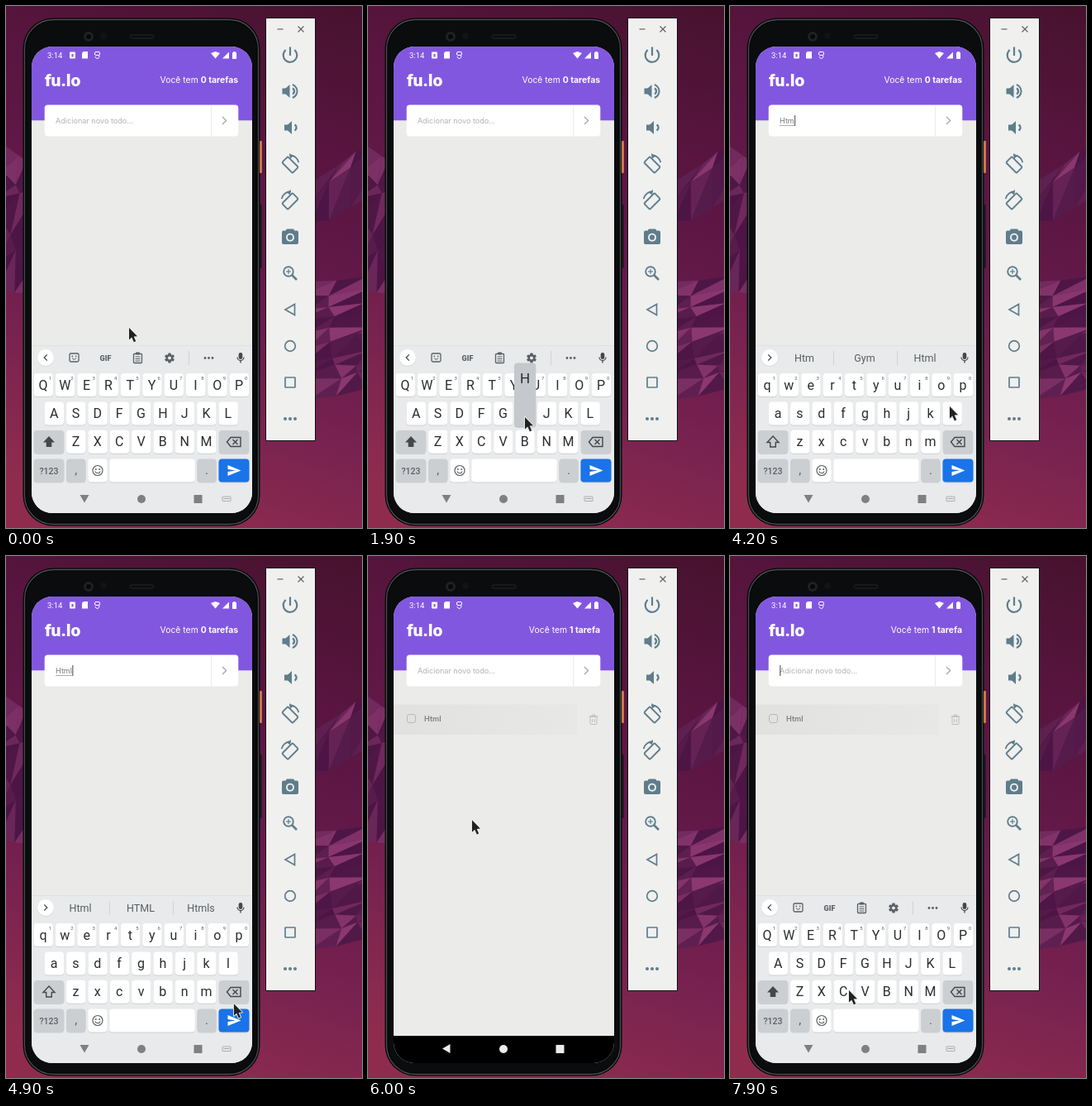
An HTML page with a canvas that plays this animation: 431x631 px, repeating every 8000 ms.

```html
<!DOCTYPE html>
<html lang="pt">
<head>
<meta charset="utf-8">
<style>
html, body { margin: 0; width: 100%; height: 100%; overflow: hidden; background: #64184a; }
canvas { display: block; width: 431px; height: 631px; }
</style>
</head>
<body>
<canvas id="stage"></canvas>
<script>
const W = 431, H = 631, LOOP = 8000, STEP = 100;
const canvas = document.getElementById('stage');
const c = canvas.getContext('2d');
const dpr = window.devicePixelRatio || 1;
canvas.width = W * dpr;
canvas.height = H * dpr;

const UI = 'Inter, sans-serif', KEY = 'Roboto, sans-serif';
const SLATE = '#5f7d8b', INK = '#2b2d2f', GRAY = '#5c6064', DARK = '#45484b', SPECIAL = '#cbcfd2';
const ROWS = ['qwertyuiop', 'asdfghjkl', 'zxcvbnm'], PITCH = 26.35, MID = 163.8;
const SEND = 5300, ADDED = 5600, FOCUS = 6800, BLINK = 500, PANEL = 202;

const PRESSES = [
  { down: 1800, up: 2000, ch: 'H', hints: ['H', 'Hoje', 'Há'] },
  { down: 2500, up: 2700, ch: 't', hints: ['Ht', 'HT', 'Https'] },
  { down: 3700, up: 3900, ch: 'm', hints: ['Htm', 'Gym', 'Html'] },
  { down: 4600, up: 4800, ch: 'l', hints: ['Html', 'HTML', 'Htmls'] }
];
// start, end and goal of each pointer move
const HOME = [149, 389];
const MOVES = [
  [300, 1300, 190, 497], [2000, 2300, 161, 462], [2600, 3500, 249, 523], [3900, 4200, 266, 484],
  [4700, 5100, 280, 565], [5400, 6100, 122, 313], [6100, 6500, 109, 141],
  [6800, 7000, 95, 210], [7000, 7700, 144, 525]
];

const ramp = (t, a, b) => Math.min(1, Math.max(0, (t - a) / (b - a)));
const easeOut = u => Math.sin(u * Math.PI / 2);

function pointerAt(t) {
  let [x, y] = HOME;
  for (const [a, b, gx, gy] of MOVES) {
    const k = easeOut(ramp(t, a, b));
    x += (gx - x) * k;
    y += (gy - y) * k;
  }
  return [x, y];
}

// shut runs 0 to 1 as the keyboard closes
function panelAt(t) {
  const opening = t >= FOCUS;
  const shut = opening ? 1 - ramp(t, FOCUS, FOCUS + 600) : ramp(t, SEND, SEND + 300);
  return { shut, slide: PANEL * shut ** (opening ? 2.1 : 2.7) };
}

function fieldAt(t) {
  if (t >= ADDED) return { word: '', hints: null, since: FOCUS + 100 };
  const done = PRESSES.filter(p => t >= p.up), last = done[done.length - 1];
  if (!last) return { word: '', hints: null, since: 100 };
  return { word: done.map(p => p.ch).join(''), hints: t < SEND ? last.hints : [], since: last.up };
}

function box(x, y, w, h, r, fill) {
  c.beginPath();
  c.roundRect(x, y, w, h, r);
  c.fillStyle = fill;
  c.fill();
}
function frame(x, y, w, h, r, color, lw = 1) {
  c.beginPath();
  c.roundRect(x, y, w, h, r);
  c.strokeStyle = color;
  c.lineWidth = lw;
  c.stroke();
}
function trace(p, close) {
  c.beginPath();
  for (let i = 0; i < p.length; i += 2) c.lineTo(p[i], p[i + 1]);
  if (close) c.closePath();
}
function poly(p, fill) {
  trace(p, true);
  c.fillStyle = fill;
  c.fill();
}
function line(p, color, lw = 1, close = false) {
  trace(p, close);
  c.strokeStyle = color;
  c.lineWidth = lw;
  c.stroke();
}
function arc(x, y, r, color, lw, a = 0, b = 360) {
  c.beginPath();
  c.arc(x, y, r, a * Math.PI / 180, b * Math.PI / 180);
  c.strokeStyle = color;
  c.lineWidth = lw;
  c.stroke();
}
function dot(x, y, r, fill) {
  c.beginPath();
  c.arc(x, y, r, 0, Math.PI * 2);
  c.fillStyle = fill;
  c.fill();
}
function dots(x, y, gap, r, fill) {
  for (let i = -1; i <= 1; i++) dot(x + i * gap, y, r, fill);
}
function cross(x, y, r, color, lw) {
  line([x - r, y - r, x + r, y + r], color, lw);
  line([x + r, y - r, x - r, y + r], color, lw);
}
function chevron(x, y, dx, dy, color) {
  line([x - dx, y - dy, x + dx, y, x - dx, y + dy], color, 1.3);
}
function text(s, x, y, font, color, align = 'left') {
  c.font = font;
  c.fillStyle = color;
  c.textAlign = align;
  c.fillText(s, x, y);
  return c.measureText(s).width;
}
function at(x, y, draw, angle = 0, flip = 1) {
  c.save();
  c.translate(x, y);
  c.scale(flip, 1);
  c.rotate(angle * Math.PI / 180);
  draw();
  c.restore();
}
function seeded(s) {
  return () => (s = (s * 16807) % 2147483647) / 2147483647;
}

// low-poly patch: a jittered grid split into triangles
function shards(x, y, w, h, cols, rows, rise, seed) {
  const rnd = seeded(seed), dx = w / cols, dy = h / rows, grid = [];
  for (let j = 0; j <= rows; j++) {
    grid.push([]);
    for (let i = 0; i <= cols; i++) {
      grid[j].push([x + (i + rnd() * .7) * dx, y + (j + rnd() * .8) * dy - rise * i]);
    }
  }
  for (let j = 0; j < rows; j++) {
    for (let i = 0; i < cols; i++) {
      const a = grid[j][i], b = grid[j][i + 1], d = grid[j + 1][i], e = grid[j + 1][i + 1];
      for (const tri of [[a, b, d], [b, e, d]]) {
        const k = rnd();
        poly(tri.flat(), `hsl(${306 + k * 14} ${58 - k * 16}% ${19 + k * k * 20}%)`);
      }
    }
  }
}

function wallpaper() {
  const g = c.createLinearGradient(400, 0, 180, H);
  ['#48122f', '#58153f', '#64194a', '#782250', '#8f2c4e'].forEach((s, i) => g.addColorStop(i / 4, s));
  c.fillStyle = g;
  c.fillRect(0, 0, W, H);
  shards(-16, 152, 40, 165, 2, 5, -8, 17);
  shards(362, 200, 80, 55, 3, 2, 16, 29);
  shards(352, 330, 100, 135, 3, 9, 5, 71);
}

function phone() {
  box(20.5, 14.5, 287, 614, 37, '#060707');
  frame(22.5, 16.5, 283, 610, 35, '#454f4f', 1.3);
  box(24.5, 18.5, 279, 606, 33, '#0a0c0d');
  box(307, 163, 3, 39, 1, '#cc7648');
  box(306.5, 240, 3, 77, 1, '#141617');
  dot(100, 37, 6, '#1f2224');
  dot(100, 37, 3, '#08090a');
  dot(118, 36, 4, '#111314');
  frame(150, 35, 29, 4, 2, '#2b2f31', .8);
}

function power() {
  arc(0, .5, 8.3, SLATE, 2.2, -50, 230);
  line([0, -9.5, 0, 1], SLATE, 2.2);
}
function speaker(x, waves) {
  box(x, -3.5, 5, 7, 0, SLATE);
  poly([x + 3, -2.5, x + 9, -8, x + 9, 8, x + 3, 2.5], SLATE);
  arc(x + 10.5, 0, 4, SLATE, 2.4, -60, 60);
  if (waves > 1) arc(x + 9.5, 0, 8.5, SLATE, 2, -70, 70);
}
function turn(flip) {
  at(0, 0, () => {
    at(0, 1, () => frame(-5, -9, 10, 18, 1.5, SLATE, 1.9), -45);
    arc(0, 0, 10.5, SLATE, 1.8, -95, -10);
    poly([-1, -13, 4, -9.5, 0, -6.5], SLATE);
  }, 0, flip);
}
function camera() {
  box(-5, -9.5, 10, 5, 1.5, SLATE);
  box(-10, -7.5, 20, 16.5, 2, SLATE);
  dot(0, .7, 5, '#f0f0ef');
  dot(0, .7, 3.1, SLATE);
}
function magnifier() {
  arc(-2, -2, 5.8, SLATE, 1.9);
  line([2.5, 2.5, 8, 8], SLATE, 2.6);
  line([-5, -2, 1, -2], SLATE, 1.2);
  line([-2, -5, -2, 1], SLATE, 1.2);
}

const TOOLS = [
  power, () => speaker(-9.5, 2), () => speaker(-7, 1), () => turn(1), () => turn(-1), camera, magnifier,
  () => line([-6, 0, 5.5, -6.5, 5.5, 6.5], SLATE, 1.7, true),
  () => arc(0, 0, 6.3, SLATE, 1.7),
  () => frame(-6, -6, 12, 12, .5, SLATE, 1.7),
  () => dots(0, 0, 6, 2, SLATE)
];

function toolbar() {
  box(314, 14, 61, 512, 1, '#111');
  box(315, 15, 59, 510, 0, '#f0f0ef');
  line([328.5, 28, 335.5, 28], '#666', 1.2);
  cross(357, 28, 3.5, '#666', 1.2);
  TOOLS.forEach((draw, i) => at(344, 59 + i * 44, draw));
}

function statusBar() {
  text('3:14', 50, 63, '9.5px ' + KEY, '#fff');
  box(77, 55.5, 7, 8, 1, '#fff');
  box(79.5, 58, 2, 3.5, 0, '#8257e0');
  box(92, 55, 7, 8.5, [3, 0, 0, 0], '#fff');
  frame(107.5, 55.5, 6, 4, 1.5, '#fff');
  arc(110.5, 61, 2.4, '#fff', 1, -60, 180);
  poly([248, 57, 253.5, 55, 259, 57, 253.5, 63.5], '#fff');
  poly([262, 63.5, 270, 63.5, 270, 55.5], '#fff');
  box(274, 56, 5, 8, .8, '#fff');
  box(275.3, 55, 2.4, 2, 0, '#fff');
}

function header(count) {
  c.fillStyle = '#8257e0';
  c.fillRect(31, 49, 267, 89.3);
  statusBar();
  text('fu.lo', 47, 97, '900 21px ' + KEY, '#fff');
  const w = text(count ? '1 tarefa' : '0 tarefas', 281, 93, '700 10.4px ' + UI, '#fff', 'right');
  text('Você tem ', 281 - w, 93, '10.4px ' + UI, '#fff', 'right');
}

function field(word, caret, composing) {
  box(46.7, 119.4, 234.6, 38.2, 4, '#fff');
  line([248.5, 120, 248.5, 157], '#ebebeb');
  chevron(264.3, 138.5, 2.3, 4.5, '#a5a5a5');
  if (!word) text('Adicionar novo todo...', 60, 142, '9.1px ' + UI, '#b2b2b2');
  const w = word ? text(word, 60, 142, '9.1px ' + UI, '#777') : 0;
  if (composing) line([60, 144.5, 60 + w, 144.5], '#999', .8);
  if (caret) line([60.8 + w, 132, 60.8 + w, 145], '#555', 1.1);
}

function task() {
  const g = c.createLinearGradient(31, 0, 254, 0);
  g.addColorStop(0, '#e1e1e0');
  g.addColorStop(1, '#e8e8e7');
  c.fillStyle = g;
  c.fillRect(31, 179.5, 222, 36.5);
  frame(47.5, 191.5, 10, 10, 2.5, '#b9b9b9');
  text('Html', 68, 200, '600 9.1px ' + UI, '#808080');
  line([267.5, 194, 278.5, 194], '#bdbdbd');
  frame(269, 194, 8, 9.5, 1, '#bdbdbd');
  frame(271, 192, 4, 2, .5, '#bdbdbd');
  [271.7, 274.3].forEach(x => line([x, 197, x, 201], '#bdbdbd'));
}

function keyAt(ch) {
  const r = ROWS.findIndex(row => row.includes(ch.toLowerCase())), row = ROWS[r];
  return [MID + (row.indexOf(ch.toLowerCase()) - (row.length - 1) / 2) * PITCH, 458 + r * 34.4];
}

function key(x, y, w, fill = '#fff') {
  box(x - w / 2, y - 13, w, 28, 4, '#cdd0d2');
  box(x - w / 2, y - 14, w, 28, 4, fill);
}

function toolIcons() {
  frame(77, 420, 11, 10, 1.5, GRAY, 1.3);
  dot(80.3, 423.3, .9, GRAY);
  dot(84.7, 423.3, .9, GRAY);
  arc(82.5, 425, 2.2, GRAY, 1, 10, 170);
  text('GIF', 120.5, 428.5, '900 9px ' + KEY, GRAY, 'center');
  frame(154.5, 420.5, 10, 11, 1, GRAY, 1.3);
  box(157, 418.5, 5, 3, 1, GRAY);
  for (let y = 424; y < 430; y += 2.5) line([156.5, y, 162.5, y], GRAY);
  for (let a = 0; a < 360; a += 60) at(198, 425.5, () => box(-1.7, -6, 3.4, 4, .7, GRAY), a);
  arc(198, 425.5, 3.3, GRAY, 2.3);
  line([221.5, 417, 221.5, 434], '#d0d3d6');
  dots(245.5, 425.5, 4.5, 1.4, GRAY);
}

function strip(hints) {
  dot(48, 425.7, 10.3, '#d8dadd');
  dot(48, 425, 10, '#fff');
  chevron(48, 425, hints ? 1.8 : -1.8, 3.6, DARK);
  box(281.7, 419, 4.6, 8, 2.3, DARK);
  arc(284, 424.5, 4, DARK, 1.2, 0, 180);
  line([284, 428.5, 284, 431.5], DARK, 1.3);
  if (!hints) return toolIcons();
  hints.forEach((s, i) => {
    text(s, 90 + i * 73, 430, '12.5px ' + KEY, '#5a5e61', 'center');
    if (i) line([48.5 + i * 77, 417, 48.5 + i * 77, 434], '#d0d3d6');
  });
}

function letters(upper) {
  ROWS.forEach((row, r) => [...row].forEach((ch, i) => {
    const [x, y] = keyAt(ch);
    key(x, y, 23.3);
    text(upper ? ch.toUpperCase() : ch, x - .3, y + 5.5, '16px ' + KEY, INK, 'center');
    if (!r) text((i + 1) % 10, x + 8.3, y - 6, '6px ' + KEY, GRAY, 'center');
  }));
}

function specials(upper) {
  [52, 276].forEach(x => key(x, 527, 36.5, SPECIAL));
  const half = [[0, -7], [7, .5], [3.3, .5], [3.3, 6]];
  const shift = [...half, ...half.slice(1).reverse().map(([x, y]) => [-x, y])].flat();
  at(52, 527, () => upper ? poly(shift, DARK) : line(shift, DARK, 1.4, true));
  line([267.5, 527, 272, 521.5, 284, 521.5, 284, 532.5, 272, 532.5], DARK, 1.4, true);
  cross(277.5, 527, 3, DARK, 1.4);

  const y = 561.5;
  key(52, y, 36.5, SPECIAL);
  text('?123', 52, y + 4, '500 10.5px ' + KEY, GRAY, 'center');
  [[',', 84.8], ['.', 243]].forEach(([s, x]) => {
    key(x, y, 23.3, SPECIAL);
    text(s, x, y + 4.5, '15px ' + KEY, GRAY, 'center');
  });
  key(111, y, 23.3);
  arc(111, y, 6, GRAY, 1.2);
  dot(108.8, y - 1.5, 1, GRAY);
  dot(113.2, y - 1.5, 1, GRAY);
  arc(111, y, 3.2, GRAY, 1.1, 15, 165);
  key(177, y, 103.5);
  key(276, y, 37, '#1a73e8');
  at(276, y, () => poly([-7.5, -6.5, 8.5, 0, -7.5, 6.5, -7.5, 1.5, 2, 0, -7.5, -1.5], '#fff'));
}

function popup(ch) {
  const [x, y] = keyAt(ch);
  box(x - 13, y - 60.5, 26, 77.5, 4, '#b4b9bd');
  box(x - 13, y - 61, 26, 77, 4, '#c5c9cd');
  text(ch, x, y - 36, '17px ' + KEY, INK, 'center');
}

function keyboard(hints, press) {
  c.fillStyle = '#e8eaeb';
  c.fillRect(31, 410, 267, 203);
  line([31, 410.5, 298, 410.5], '#e0e2e3');
  strip(hints);
  letters(!hints);
  specials(!hints);
  if (press) popup(press.ch);
}

function navBar(shut) {
  c.fillStyle = `rgba(0,0,0,${shut})`;
  c.fillRect(31, 580, 267, 33);
  const v = 128 + 108 * shut, color = `rgb(${v},${v},${v})`;
  at(95, 595.5, () => poly([5, 0, -4.5, -5.5, -4.5, 5.5], color), 90 - 270 * Math.min(1, shut * 1.4));
  dot(164, 596, 5, color);
  box(227.5, 591, 10, 10, .5, color);
  c.globalAlpha = 1 - shut;
  frame(262, 593, 10, 5.5, .5, '#a4a6a8', .9);
  line([263.5, 595.5, 270.5, 595.5], '#a4a6a8');
  c.globalAlpha = 1;
}

function pointer(x, y) {
  const p = [0, 0, 0, 14.5, 3.3, 11.5, 5.8, 17.3, 8.2, 16.2, 5.7, 10.6, 10, 10.3];
  c.lineJoin = 'round';
  at(x, y, () => {
    line(p, '#f0f0f0', 1.8, true);
    poly(p, '#222');
  });
  c.lineJoin = 'miter';
}

function screen(t) {
  const { word, hints, since } = fieldAt(t), { shut, slide } = panelAt(t);
  const focused = t < SEND || t > FOCUS;
  const caret = focused && t >= since && (t - since) % (2 * BLINK) < BLINK;
  c.fillStyle = '#ebebea';
  c.fillRect(31, 49, 267, 564);
  header(t >= ADDED);
  field(word, caret, word && t < SEND);
  if (t >= ADDED) task();
  if (t > FOCUS && shut) {
    c.fillStyle = '#fbfbf9';
    c.fillRect(31, 411, 267, PANEL);
  }
  c.save();
  c.globalAlpha = 1 - shut * .6;
  c.translate(0, slide);
  if (shut < 1) keyboard(hints, PRESSES.find(p => t >= p.down && t < p.up));
  c.restore();
  navBar(shut);
}

function draw(t) {
  c.setTransform(dpr, 0, 0, dpr, 0, 0);
  wallpaper();
  phone();
  toolbar();
  c.save();
  c.beginPath();
  c.roundRect(31, 49, 267, 564, 25);
  c.clip();
  screen(t);
  c.restore();
  pointer(...pointerAt(t));
}

const begin = performance.now();
function tick() {
  const t = (performance.now() - begin) % LOOP;
  draw(Math.floor(t / STEP) * STEP);
  requestAnimationFrame(tick);
}
tick();
</script>
</body>
</html>
```
